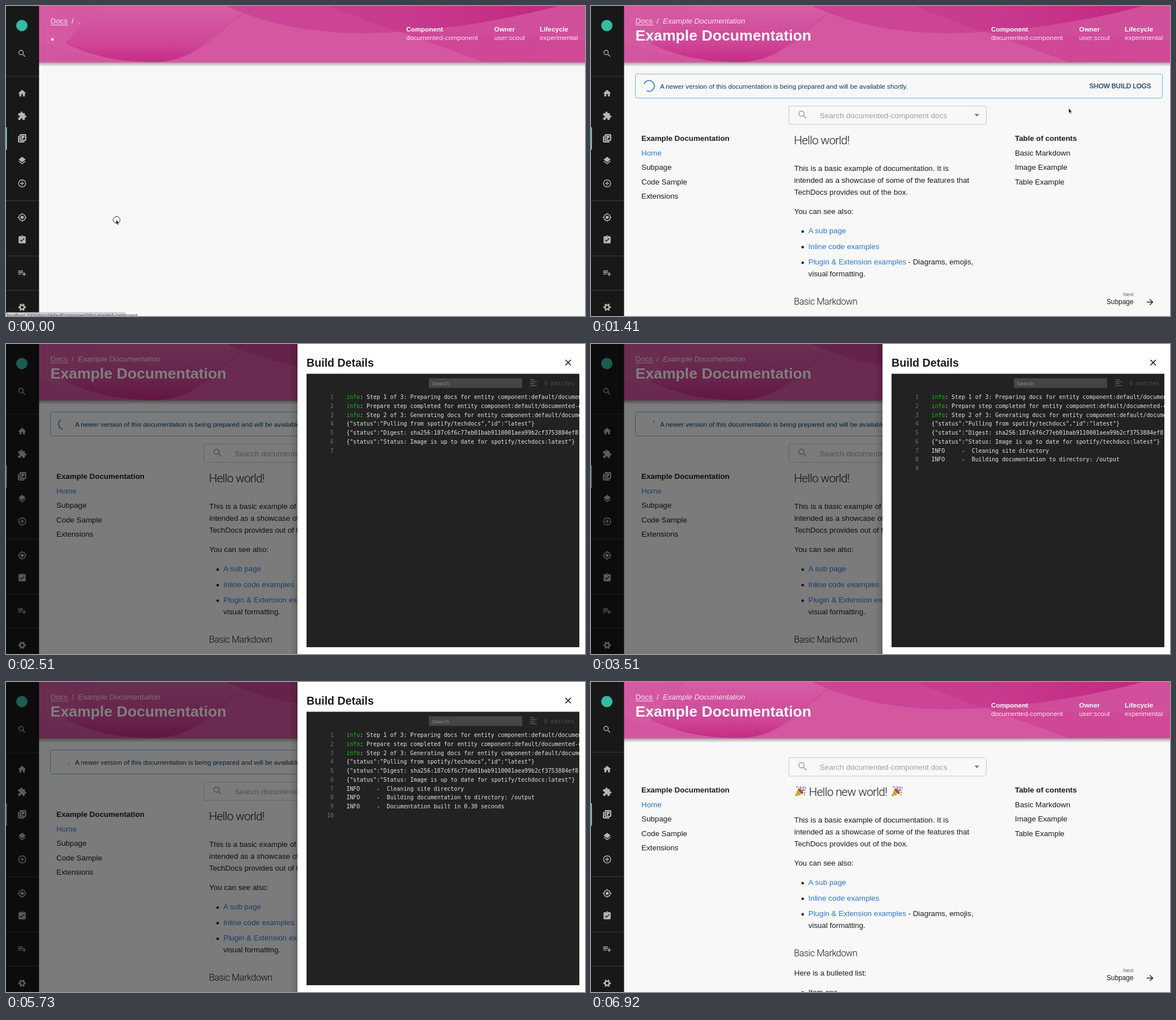
An HTML page that plays this animation: 1023 by 547 pixels, repeating every 8000 ms.

```html
<!DOCTYPE html>
<html lang="en">
<head>
<meta charset="utf-8">
<title>Documentation build</title>
<style>
html, body { margin: 0; width: 100%; height: 100%; overflow: hidden; background: #f8f8f8; }
svg { display: block; width: 1023px; height: 547px; }
text { font: 13.35px "Liberation Sans", Arial, sans-serif; fill: #1c1c1c; white-space: pre; }
.b { font-weight: bold; }
.white text { fill: #fff; }
.white .soft { fill: #fbe3f0; }
.crumb { font-style: italic; }
.title { font-size: 26.65px; }
.meta text { font-size: 11.75px; }
.link { fill: #2e77d0; }
.thin { font-family: Roboto, "Open Sans", sans-serif; font-weight: 300; font-size: 20.8px; letter-spacing: -.035em; }
.thin.h2 { font-size: 16.3px; letter-spacing: -.028em; }
.alert text { font-size: 11.67px; }
.alert rect { fill: none; }
.alert .button { font-size: 11.62px; stroke-width: .35px; }
.info text { fill: #0d3c61; }
.info .button { stroke: #0d3c61; }
.done text { fill: #1e4620; }
.done .button { stroke: #1e4620; }
#log text, .mono { font: 9.875px "DejaVu Sans Mono", monospace; fill: #e4e4e4; }
#log .num { fill: #707070; text-anchor: end; }
#log .tag { fill: #10c010; }

#drawer, #backdrop, #cursor, #status { animation: 8s linear infinite; }
#drawer { animation-name: slide; }
#backdrop { animation-name: dim; }
#cursor { animation-name: point; }
#status { animation-name: leave; }
#content { animation: shift 8s step-end infinite; }
@keyframes slide {
  0%, 24.07% { transform: translateX(540px); }
  24.075% { transform: translateX(508px); animation-timing-function: cubic-bezier(0, 0, .2, 1); }
  26.8875%, 72.374% { transform: none; }
  72.375%, 100% { transform: translateX(540px); }
}
@keyframes dim {
  0%, 24.075% { opacity: 0; animation-timing-function: cubic-bezier(.4, 0, .2, 1); }
  26.8875%, 72.374% { opacity: .5; }
  72.375%, 100% { opacity: 0; }
}
@keyframes point {
  0%, 8.375% { transform: translate(194.5px, 377px); animation-timing-function: ease-in-out; }
  17.6%, 19.1% { transform: translate(844px, 180.5px); animation-timing-function: ease-in-out; }
  23.4%, 60% { transform: translate(972px, 138px); }
  60.01%, 100% { transform: translate(980px, 137.5px); }
}
@keyframes leave {
  0%, 4.875% { opacity: 1; }
  6.25%, 100% { opacity: 0; }
}
@keyframes shift {
  0%, 83.75% { transform: translateY(-43px); }
  8.375% { transform: none; }
  72.375% { transform: translateY(-1.7px); }
}
</style>
</head>
<body>
<svg viewBox="0 0 1023 547">
  <defs>
    <linearGradient id="pink"><stop stop-color="#d55ba2"/><stop offset=".5" stop-color="#cf4798"/><stop offset="1" stop-color="#d1509c"/></linearGradient>
    <linearGradient id="fold" x2="0" y2="1"><stop stop-color="#d55fa4"/><stop offset=".65" stop-color="#cf4798"/><stop offset="1" stop-color="#c62c84"/></linearGradient>
    <linearGradient id="crest"><stop stop-color="#cb4495"/><stop offset=".5" stop-color="#cb4495"/><stop offset="1" stop-color="#c1257e"/></linearGradient>
    <linearGradient id="drop" x2="0" y2="1"><stop stop-opacity=".36"/><stop offset="1" stop-opacity="0"/></linearGradient>
    <linearGradient id="edge"><stop stop-opacity="0"/><stop offset="1" stop-opacity=".16"/></linearGradient>
    <clipPath id="header"><path d="M58 0H1023V99.500H58z"/></clipPath>
    <clipPath id="panel"><path d="M531 53H1013V535H531z"/></clipPath>
    <path id="lens" d="M15.500 14h-.79l-.28-.27A6.470 6.470 0 0 0 16 9.500 6.500 6.500 0 1 0 9.500 16c1.610 0 3.090-.59 4.230-1.570l.27.28v.79l5 4.990L20.490 19zm-6 0a4.500 4.500 0 1 1 0-9 4.500 4.500 0 0 1 0 9z"/>
    <path id="arrow" d="M0 0V8.500L2 6.700L3.500 9.700L4.900 9L3.500 6.200H6z" fill="#111" stroke="#fff" stroke-width=".6"/>
    <g id="popper">
      <path d="M1 20L7 6Q15 10 16 15z" fill="#f2b632"/>
      <path d="M5 11q3 3 4 7M3 16l2 3" stroke="#b9793a" fill="none" stroke-width="1.500"/>
      <ellipse cx="11.500" cy="10.500" rx="6" ry="2.500" transform="rotate(45 11.500 10.500)" fill="#8c5a2d"/>
      <path d="M10 9q3-3 1-7M13 12q2-4 7-3" stroke="#9a5fd0" fill="none" stroke-width="1.600"/>
      <path d="M12 10q5-2 5-8" stroke="#e85b78" fill="none" stroke-width="1.500"/>
      <g fill="#4b9be8"><circle cx="5" cy="3" r="1.300"/><circle cx="19" cy="13" r="1.200"/><circle cx="14" cy="4" r="1"/></g>
      <g fill="#e8577c"><circle cx="8" cy="4" r="1"/><circle cx="18" cy="17" r="1.200"/><circle cx="20" cy="5" r="1.200"/></g>
    </g>
  </defs>
  <rect width="1023" height="547" fill="#f8f8f8"/>

  <rect x="58" y="99" width="965" height="8" fill="url(#drop)"/>
  <g clip-path="url(#header)">
    <rect x="58" width="965" height="100" fill="url(#pink)"/>
    <path d="M165 0L105 66C150 88 200 99 260 99C350 97 360 40 440 0z" fill="url(#fold)"/>
    <path d="M58 61C120 87 190 99 260 99H58z" fill="#d4559f"/>
    <path d="M440 0C375 38 350 97 270 99H845L690 43z" fill="#d4579f"/>
    <path d="M390 0C470 36 550 48 630 48C760 47 880 25 975 0z" fill="url(#crest)"/>
    <path d="M570 0L690 45C790 40 890 22 975 0z" fill="#c32e88" opacity=".35"/>
    <path d="M690 43L845 99H1023V62C900 45 800 60 690 43z" fill="#ca3c91" opacity=".35"/>
  </g>
  <g class="white">
    <text x="78.500" y="31" class="soft">Docs</text>
    <path d="M79 33.500H110" stroke="#fbe3f0"/>
    <text x="116" y="31" class="soft">/</text>
    <g data-on="0 60"><text x="127" y="31" class="soft">.</text><rect x="80" y="57" width="4" height="4" fill="#fff"/></g>
    <g data-on="60 8000">
      <text x="127" y="31" class="soft crumb">Example Documentation</text>
      <text x="78.500" y="61" class="b title">Example Documentation</text>
    </g>
    <g class="meta">
      <text x="707" y="45" class="b">Component</text><text x="707" y="60" class="soft">documented-component</text>
      <text x="862.500" y="45" class="b">Owner</text><text x="862.500" y="60" class="soft">user:scout</text>
      <text x="943" y="45" class="b">Lifecycle</text><text x="943" y="60" class="soft">experimental</text>
    </g>
  </g>

  <g data-on="150 8000">
    <g id="content">
      <rect x="349.500" y="176.500" width="349" height="32.500" rx="3" fill="none" stroke="#c6c6c6"/>
      <use href="#lens" transform="translate(364 182) scale(.83)" fill="#a5a5a5"/>
      <text x="404" y="197.500" style="font-size:13.550px;fill:#a0a0a0">Search documented-component docs</text>
      <path d="M677.500 190.500h8.500l-4.250 4.500z" fill="#757575"/>

      <text x="89" y="238.300" class="b">Example Documentation</text>
      <text x="89" y="263.700" class="link">Home</text>
      <text x="89" y="289.200">Subpage</text>
      <text x="89" y="314.600">Code Sample</text>
      <text x="89" y="340">Extensions</text>
      <text x="749" y="238.300" class="b">Table of contents</text>
      <text x="749" y="263.700">Basic Markdown</text>
      <text x="749" y="289.200">Image Example</text>
      <text x="749" y="314.600">Table Example</text>

      <text x="358.500" y="244" class="thin" data-on="150 6860">Hello world!</text>
      <g data-on="6860 8000">
        <use href="#popper" x="359" y="225"/>
        <text x="385" y="244" class="thin">Hello new world!</text>
        <use href="#popper" x="529.500" y="225"/>
      </g>
      <text x="359" y="291">This is a basic example of documentation. It is</text>
      <text x="359" y="312">intended as a showcase of some of the features that</text>
      <text x="359" y="333">TechDocs provides out of the box.</text>
      <text x="359" y="367">You can see also:</text>
      <g fill="#1c1c1c"><circle cx="374" cy="398" r="2.300"/><circle cx="374" cy="425.500" r="2.300"/><circle cx="374" cy="453" r="2.300"/><circle cx="374" cy="591" r="2.300"/></g>
      <text x="384" y="401.200" class="link">A sub page</text>
      <text x="384" y="428.700" class="link">Inline code examples</text>
      <text x="384" y="456.200"><tspan class="link">Plugin &amp; Extension examples</tspan> - Diagrams, emojis,</text>
      <text x="384" y="477.200">visual formatting.</text>
      <text x="358.500" y="527" class="thin h2">Basic Markdown</text>
      <text x="359" y="561">Here is a bulleted list:</text>
      <text x="384" y="594.500">Item one</text>
    </g>
    <text x="958.500" y="512" text-anchor="end" style="font-size:9px;fill:#666">Next</text>
    <text x="958.500" y="526.300" text-anchor="end" style="font-size:11.900px">Subpage</text>
    <path d="M982 522.500h10M987.500 517.500l5 5l-5 5" fill="none" stroke="#1c1c1c" stroke-width="1.400"/>
  </g>

  <g class="alert info" data-on="670 5790">
    <rect x="78.500" y="120" width="931" height="42.500" rx="3" stroke="#6cb5ee"/>
    <circle id="spinner" cx="102.500" cy="141" r="9.500" pathLength="126.900" fill="none" stroke="#3f7bd6" stroke-width="1.700"/>
    <text x="122" y="145.700">A newer version of this documentation is being prepared and will be available shortly.</text>
    <text x="880.500" y="145.200" class="button">SHOW BUILD LOGS</text>
  </g>
  <g class="alert done" data-on="5790 6700">
    <rect x="78.500" y="120" width="931" height="40.500" rx="3" stroke="#79c37c"/>
    <path d="M108.500 138.500A7 7 0 1 1 104.500 134M98 139.500l3 3l7.500-7.500" fill="none" stroke="#4caf50" stroke-width="1.500"/>
    <text x="120.500" y="145">A newer version of this documentation is now available, please refresh to view.</text>
    <text x="935.500" y="144.500" class="button">REFRESH</text>
  </g>

  <g id="sidebar" fill="#b5b5b5">
    <rect width="58.400" height="547" fill="#181818"/>
    <path d="M0 124H58M0 343.500H58M0 441H58M0 501.500H58" stroke="#3d3d3d"/>
    <rect y="214" width="1.500" height="39.500" fill="#7fe6d3"/>
    <circle cx="28" cy="34.500" r="10" fill="#36baa2"/>
    <use href="#lens" transform="translate(20 75.500) scale(.7)"/>
    <g transform="translate(28.500 531.500)" fill="none" stroke="#b5b5b5">
      <circle r="3.700" stroke-width="2.600"/>
      <circle r="5.600" stroke-width="2.200" pathLength="12" stroke-dasharray="1" stroke-dashoffset=".5"/>
    </g>
  </g>

  <g id="status">
    <rect y="541" width="211" height="8" rx="2" fill="#d5d8da" stroke="#b4b7b9"/>
    <text x="1.500" y="549" style="font-size:8.150px;fill:#444">localhost:7000/docs/default/component/documented-component</text>
  </g>

  <rect id="backdrop" width="1023" height="547"/>
  <g id="drawer">
    <rect x="502" width="13" height="547" fill="url(#edge)"/>
    <rect x="515" width="508" height="547" fill="#fff"/>
    <text x="531" y="40" class="b" style="font-size:19.650px">Build Details</text>
    <path d="M988.500 28l9.500 9.500m0-9.500l-9.500 9.500" stroke="#1c1c1c" stroke-width="1.700"/>
    <rect x="531" y="52.500" width="482" height="482.500" fill="#222"/>
    <rect x="747" y="60.500" width="165" height="17" fill="#454545"/>
    <text x="752" y="72.500" style="font-size:9.700px;fill:#878787">Search</text>
    <path d="M926 63h8M926 66.500h12M926 70h8M926 73.500h12" stroke="#5c5c5c" stroke-width="1.300"/>
    <text x="951" y="72.800" class="mono" style="fill:#4d4d4d">0 matches</text>
    <g id="log" clip-path="url(#panel)"></g>
  </g>

  <g id="cursor">
    <circle cx="1" cy=".5" r="6" fill="none" stroke="#222" data-on="0 60"/>
    <use href="#arrow" data-on="0 2330"/>
    <use href="#arrow" data-on="6410 6700"/>
  </g>
</svg>
<script>
const SVG = 'http://www.w3.org/2000/svg';
const LOOP = 8000;
const byId = id => document.getElementById(id);

function add(parent, tag, attrs, content = '') {
  const el = document.createElementNS(SVG, tag);
  for (const key in attrs) el.setAttribute(key, attrs[key]);
  el.textContent = content;
  return parent.appendChild(el);
}

// Sidebar icons on a 24-unit grid, keyed by their vertical centre.
const icons = {
  154: 'M10 20v-6h4v6h5v-8h3L12 3 2 12h3v8z',
  194: 'M20.5 11H19V7a2 2 0 0 0-2-2h-4V3.500a2.500 2.500 0 0 0-5 0V5H4a2 2 0 0 0-2 2v3.800h1.500a2.700 2.700 0 0 1 0 5.400H2V20a2 2 0 0 0 2 2h3.800v-1.500a2.700 2.700 0 0 1 5.400 0V22H17a2 2 0 0 0 2-2v-4h1.500a2.500 2.500 0 0 0 0-5z',
  233.5: 'M4 6H2v14a2 2 0 0 0 2 2h14v-2H4zM20 2H8a2 2 0 0 0-2 2v12a2 2 0 0 0 2 2h12a2 2 0 0 0 2-2V4a2 2 0 0 0-2-2zm0 14H8V4h12zM10 9h8v2h-8zm0 3h4v2h-4zm0-6h8v2h-8z',
  273: 'M12 18.5l-7.400-5.700L3 14l9 7 9-7-1.600-1.200zM12 16l7.400-5.700L21 9l-9-7-9 7 1.600 1.300z',
  313: 'M13 7h-2v4H7v2h4v4h2v-4h4v-2h-4zM12 2a10 10 0 1 0 0 20 10 10 0 0 0 0-20zm0 18a8 8 0 1 1 0-16 8 8 0 0 1 0 16z',
  373: 'M12 8a4 4 0 1 0 0 8 4 4 0 0 0 0-8zm9 3a9 9 0 0 0-8-8V1h-2v2a9 9 0 0 0-8 8H1v2h2a9 9 0 0 0 8 8v2h2v-2a9 9 0 0 0 8-8h2v-2zM12 19a7 7 0 1 1 0-14 7 7 0 0 1 0 14z',
  412.5: 'M19 3h-4.200a3 3 0 0 0-5.600 0H5a2 2 0 0 0-2 2v14a2 2 0 0 0 2 2h14a2 2 0 0 0 2-2V5a2 2 0 0 0-2-2zm-7 0a1 1 0 1 1 0 2 1 1 0 0 1 0-2zm-2 14l-4-4 1.400-1.400L10 14.200l6.600-6.600L18 9z',
  471: 'M14 10H2v2h12zm0-4H2v2h12zm4 8v-4h-2v4h-4v2h4v4h2v-4h4v-2zM2 16h8v-2H2z'
};
for (const y in icons) {
  const attrs = { d: icons[y], transform: `translate(20.1 ${y - 8.4}) scale(.7)` };
  if (y === '233.5') attrs.fill = '#fff';
  add(byId('sidebar'), 'path', attrs);
}

const entity = 'entity component:default/documented-component';
const logLines = [
  [0, `info: Step 1 of 3: Preparing docs for ${entity}`],
  [0, `info: Prepare step completed for ${entity}`],
  [0, `info: Step 2 of 3: Generating docs for ${entity}`],
  [2450, '{"status":"Pulling from spotify/techdocs","id":"latest"}'],
  [2450, '{"status":"Digest: sha256:187c6f6c77eb01bab9110001aea99b2cf3753884ef8'],
  [2450, '{"status":"Status: Image is up to date for spotify/techdocs:latest"}'],
  [2900, 'INFO     -  Cleaning site directory'],
  [2900, 'INFO     -  Building documentation to directory: /output'],
  [5330, 'INFO     -  Documentation built in 0.30 seconds'],
  [LOOP, '']
];
logLines.forEach(([start, line], i) => {
  const y = 97.2 + i * 15.72;
  const numberStart = i ? logLines[i - 1][0] : 0;
  add(byId('log'), 'text', { x: 579, y, class: 'num', 'data-on': `${numberStart} ${LOOP}` }, i + 1);
  const row = add(byId('log'), 'text', { x: 601.5, y, 'data-on': `${start} ${LOOP}` });
  const tagged = line.startsWith('info');
  if (tagged) add(row, 'tspan', { class: 'tag' }, 'info');
  row.append(tagged ? line.slice(4) : line);
});

// Each data-on="from to" (ms) becomes a stepped visibility animation.
const percent = ms => `${ms / LOOP * 100}%`;
const rules = new Map();
for (const el of document.querySelectorAll('[data-on]')) {
  const [from, to] = el.dataset.on.split(' ');
  const name = `on-${from}-${to}`;
  rules.set(name, `@keyframes ${name} {
    0% { visibility: hidden; }
    ${percent(from)} { visibility: visible; }
    ${percent(to)} { visibility: hidden; }
  }`);
  el.style.animation = `${name} ${LOOP}ms step-end infinite`;
}
const sheet = document.createElement('style');
sheet.textContent = [...rules.values()].join('\n');
document.head.append(sheet);

const smooth = x => x * x * (3 - 2 * x);

function spin(t) {
  const start = t < 4050 ? 2175 : 4254;
  const phase = ((t - start) / 1400 % 1 + 1) % 1;
  const grow = smooth(Math.min(1, phase * 2));
  const shrink = smooth(Math.max(0, phase * 2 - 1));
  const spinner = byId('spinner');
  spinner.setAttribute('stroke-dasharray', `${1 + 99 * grow} 200`);
  spinner.setAttribute('stroke-dashoffset', -(15 * grow + 110 * shrink));
  spinner.setAttribute('transform', `rotate(${360 * phase} 102.5 141)`);
}

// Share the clock of the CSS animations so the spinner stays in step.
const clock = byId('drawer').getAnimations()[0];

function draw() {
  spin((clock.currentTime || 0) % LOOP);
  requestAnimationFrame(draw);
}
draw();
</script>
</body>
</html>
```
